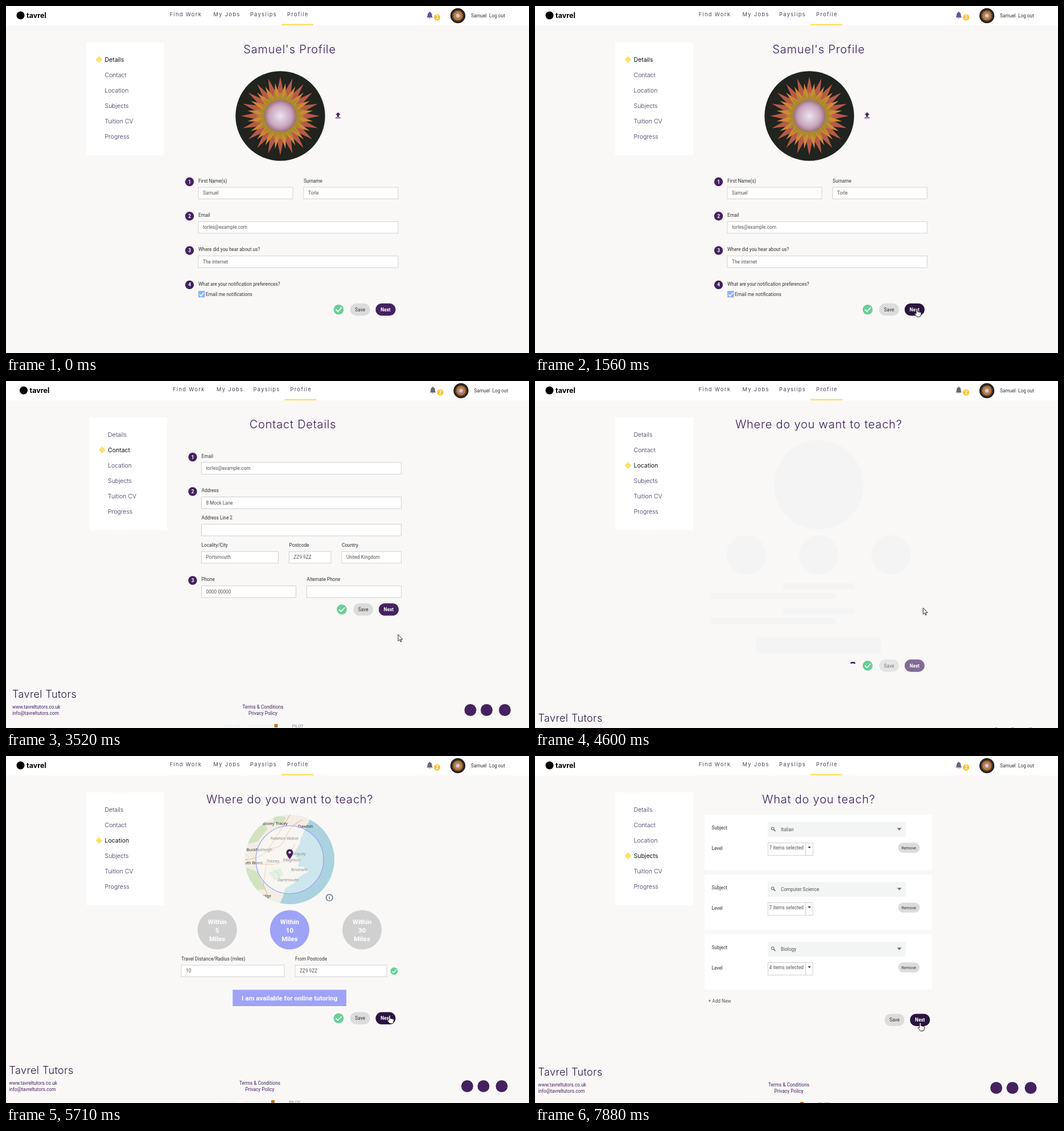
An HTML page for the animation above (8 s loop, 919 px wide and 609 px high).

```html
<!DOCTYPE html>
<html lang="en">
<head>
<meta charset="utf-8">
<title>Tutor profile walkthrough</title>
<style>
  html, body { margin: 0; width: 100%; height: 100%; overflow: hidden; background: #f9f8f7; }
  svg { display: block; width: 100%; height: 100%; }
  text { font: 8.27px Roboto, sans-serif; fill: #333; }
  .title { font: 300 20px Inter, sans-serif; letter-spacing: .8px; fill: #3a1d5c; text-anchor: middle; }
  .brand { font: 300 18px Inter, sans-serif; letter-spacing: .4px; fill: #2c1b40; }
  .logo { font: 700 12.5px Inter, sans-serif; fill: #000; }
  .nav { font: 9.3px Inter, sans-serif; letter-spacing: 1.35px; fill: #4b4358; }
  .menu { font: 300 10.5px Inter, sans-serif; fill: #3f2d5c; }
  .menu.on { fill: #111; font-weight: 400; }
  .value { fill: #555; }
  .link { fill: #452160; }
  .mid { text-anchor: middle; }
  .num { font-weight: 700; fill: #fff; text-anchor: middle; }
  .big { font-size: 11.6px; font-weight: 700; fill: #fff; text-anchor: middle; }
  .town { font: 7.2px "Noto Sans", sans-serif; fill: #333; }
  .end { text-anchor: end; }
  .small { font-size: 7.2px; text-anchor: middle; }
  .pilot { font-size: 7.6px; fill: #888; }
  .faint { font-size: 8px; fill: #ecebea; }
</style>
</head>
<body>
<svg id="stage" viewBox="0 0 919 609"></svg>
<script>
const PURPLE = '#452160', LILAC = '#9fa3f7', GREEN = '#67cf98', BONE = '#f4f4f5';
const LOOP = 8000;

const text = (x, y, s, cls = '') => `<text x="${x}" y="${y}" class="${cls}">${s}</text>`;
const rect = (x, y, x2, y2, fill, extra = '') =>
  `<rect x="${x}" y="${y}" width="${x2 - x}" height="${y2 - y}" fill="${fill}" ${extra}/>`;
const circle = (x, y, r, fill, extra = '') => `<circle cx="${x}" cy="${y}" r="${r}" fill="${fill}" ${extra}/>`;
const path = (d, fill, extra = '') => `<path d="${d}" fill="${fill}" ${extra}/>`;
const group = (id, body, extra = '') => `<g id="${id}" ${extra}>${body}</g>`;
const line = (color, width) => `stroke="${color}" stroke-width="${width}"`;
const title = s => text(498.6, 83, s, 'title');
const box = (x, y, x2, y2) => rect(x, y, x2, y2, '#fff', line('#ccc', .9));
const input = (x, x2, y, s) => box(x, y, x2, y + 20.5) + text(x + 8, y + 13, s, 'value');
const field = (x, x2, y, label, s) => text(x, y - 8.5, label) + input(x, x2, y, s);
const badge = (n, y) => circle(322.5, y, 7.7, PURPLE) + text(322.5, y + 3, n, 'num');
const tick = (x, y, r) => circle(x, y, r, GREEN) +
  path(`M${x - r * .55} ${y}l${r * .4} ${r * .42} ${r * .75} ${-r * .82}`, 'none', line('#fff', r * .2));

// Protea-like flower: three star rings round a pale heart, unit radius.
const star = (n, outer, inner, turn) => Array.from({ length: n * 2 }, (_, i) => {
  const a = (i + turn) * Math.PI / n, r = i % 2 ? inner : outer;
  return `${(r * Math.cos(a)).toFixed(3)},${(r * Math.sin(a)).toFixed(3)}`;
}).join(' ');
const petals = (fill, ...shape) => `<polygon points="${star(...shape)}" fill="${fill}"/>`;
const flower = (x, y, r) => `<g transform="translate(${x} ${y}) scale(${r})">` +
  circle(0, 0, 1, '#20231e') + petals('#b65a49', 20, .88, .5, 0) + petals('#ce8a35', 20, .74, .42, 1) +
  petals('#a98a2c', 24, .55, .4, 0) + circle(0, 0, .36, 'url(#heart)') + '</g>';

const defs = `<defs>
  <radialGradient id="heart"><stop offset="0" stop-color="#efe3ef"/><stop offset=".7" stop-color="#c7a5bb"/>
  <stop offset="1" stop-color="#9b6d78"/></radialGradient>
  <clipPath id="round"><circle cx="498.5" cy="181.5" r="78.5"/></clipPath></defs>`;

const nav = [[287.5, 'Find Work'], [364.5, 'My Jobs'], [429, 'Payslips'], [494, 'Profile']];
const header = circle(25.5, 16.5, 7, '#000') + text(36, 21, 'tavrel', 'logo') +
  nav.map(([x, s]) => text(x, 18.3, s, 'nav')).join('') + rect(484, 31.5, 540, 34, '#ffe066') +
  path('M739 20.2q1.8-1.2 1.8-4.2 0-4.2 3-4.8v-1.2h1.6v1.2q3 .6 3 4.8 0 3 1.8 4.2zM743 21h3q-1.5 1.7-3 0z', '#6b6675', 'id="bell"') +
  circle(757.5, 20, 5.5, '#fbc02d') + text(757.5, 22.5, '2', 'num') +
  flower(794, 17, 13.2) + text(817, 19.7, 'Samuel') + text(849, 19.7, 'Log out');

const menuItems = ['Details', 'Contact', 'Location', 'Subjects', 'Tuition CV', 'Progress'];
const menuY = i => 94 + 27.1 * i;
const sidebar = rect(141, 64, 277.7, 262, '#fff') +
  menuItems.map((s, i) => text(173.5, menuY(i) + 3.7, s, 'menu')).join('') +
  path('M163.5-6l6 6-6 6-6-6z', '#ffe066', 'id="marker"');

const footer = text(5.5, 556.3, 'Tavrel Tutors', 'brand') +
  text(5.5, 574.5, 'www.tavreltutors.co.uk', 'link') + text(5.5, 586.3, 'info@tavreltutors.com', 'link') +
  text(446, 574.5, 'Terms &amp; Conditions', 'link mid') + text(446, 586.3, 'Privacy Policy', 'link mid') +
  [810.5, 839, 871].map(x => circle(x, 577.5, 10.5, PURPLE)).join('') +
  text(376, 607.8, 'Sold out', 'faint') + text(421, 607.8, 'Powered by', 'faint') +
  rect(466, 602, 472, 608, '#b9772a') + text(497, 607.5, 'PILOT', 'pilot');

const details = title("Samuel's Profile") + flower(482, 193, 78.7) +
  path('M583.5 186.5l4.5 4.5h-2.7v3.7h-3.6V191h-2.7zM579 195.8h9v1.3h-9z', PURPLE) +
  [1, 2, 3, 4].map(n => badge(n, 248.2 + 60.3 * n)).join('') +
  field(338, 504, 318, 'First Name(s)', 'Samuel') + field(523, 689, 318, 'Surname', 'Torle') +
  field(338, 689, 378.3, 'Email', 'torles@example.com') +
  field(338, 689, 438.7, 'Where did you hear about us?', 'The internet') +
  text(338, 490.6, 'What are your notification preferences?') +
  rect(338, 500, 349.5, 511.5, '#8fb3f5') +
  path('M340 506l2.8 3 5-6', 'none', line('#fff', 1.6)) + text(351, 508.5, 'Email me notifications');

const contact = title('Contact Details') + badge(1, 133.5) + badge(2, 194) + badge(3, 350) +
  field(338, 689, 143, 'Email', 'torles@example.com') + field(338, 689, 203.5, 'Address', '8 Mock Lane') +
  field(338, 689, 251.3, 'Address Line 2', '') + field(338, 473, 299.2, 'Locality/City', 'Portsmouth') +
  field(492, 565.5, 299.2, 'Postcode', 'ZZ9 9ZZ') + field(584.5, 689, 299.2, 'Country', 'United Kingdom') +
  field(338, 504, 359.5, 'Phone', '0000 00000') + field(523, 689, 359.5, 'Alternate Phone', '');

const towns = [[495, 120.5, 'Bovey Tracey', 'end'], [513, 125.5, 'Dawlish'], [465, 146.5, 'Newton Abbot'],
  [468, 166.5, 'Buckfastleigh', 'end'], [527, 173.5, 'Torquay', 'end'], [487, 185, 'Paignton'],
  [458, 187, 'Totnes'], [451, 189.5, 'South Brent', 'end'], [501, 202, 'Brixham'],
  [477, 220, 'Dartmouth'], [466, 247.7, 'Kingsbridge', 'end']];
const map = rect(418, 100, 580, 262, '#f2eee6') +
  path('M418 125l28-22 14 25-18 22-24 6zM420 195l22 8 14 30-26 6zM462 205l20-8 6 12-16 10zM470 105l22 2-6 14-16-4z', '#d3e3c0') +
  path('M420 182q30-2 42-20t38-60M462 162q22 2 30-20t30-30M440 188q30 6 52-4l16-30M458 186l-6 40 14 34', 'none', line('#efb99b', 1.3)) +
  path('M540 100l-13 25-9 20-2 10-9 13 2 9 7 5-3 12 10 1 8 8-16 9-7 10-17 10-4 14-8 18h110V100zM484 224l-6-16-12-12 14 10z', '#aad3df') +
  towns.map(([x, y, s, side = '']) => text(x, y, s, 'town ' + side)).join('') +
  circle(498.5, 182, 59.5, 'rgba(255,255,255,.42)', line('#9a9ef5', 1.2)) +
  path('M498.5 181q-6-7.5-6-11.5a6 6 0 0 1 12 0q0 4-6 11.5z', PURPLE) + circle(498.5, 169.3, 2.1, '#fff');
const distance = (x, miles, fill) => circle(x, 305, 34.6, fill) +
  ['Within', miles, 'Miles'].map((s, i) => text(x, 295.3 + 14.6 * i, s, 'big')).join('');
const location_ = circle(498.5, 181.5, 78.5, BONE) + group('map', map, 'clip-path="url(#round)"') +
  circle(568.2, 248.5, 5.7, 'none', line('#333b5c', 1.1)) + rect(567.7, 247.5, 568.8, 251.5, '#333b5c') +
  rect(567.7, 245.2, 568.8, 246.4, '#333b5c') +
  distance(371.2, 5, '#d0d0d0') + distance(498.4, 10, LILAC) + distance(625.6, 30, '#d0d0d0') +
  field(308, 489, 367, 'Travel Distance/Radius (miles)', '10') + field(508, 669, 367, 'From Postcode', 'ZZ9 9ZZ') +
  tick(682, 377.5, 6.5) + rect(398.3, 410.3, 598, 439, LILAC) +
  text(498.2, 429, 'I am available for online tutoring', 'big');
const bars = (rows, fill = BONE) => rows.map(r => rect(...r, fill)).join('');
const locationBones = circle(498.5, 182, 78.5, BONE) +
  [371.2, 498.4, 625.6].map(x => circle(x, 305, 34.6, BONE)).join('') +
  bars([[436, 355, 561, 366], [308, 372, 528, 383], [436, 399, 561, 409.5], [308, 416, 528, 427], [388, 449, 608, 478]]);

const boneCard = (y, split, start) => rect(298, y, 697.5, y + 66.5, '#fff') +
  bars([[310.5, y + 12.5, split, y + 24.5], [start, y + 12.5, 651.5, y + 24.5],
    [310.5, y + 32, split, y + 44], [start, y + 32, 618.8, y + 44], [637.8, y + 32, 684.5, y + 44]]);
const subjectBones = boneCard(103, 357.5, 376) + boneCard(177.7, 390, 408.5);
const subjectCard = (y, subject, count) => rect(298, y, 697.5, y + 97, '#fff') +
  text(310.5, y + 26, 'Subject') + text(310.5, y + 62.3, 'Level') +
  rect(409, y + 13, 651.7, y + 39, '#f3f4f4') +
  circle(417.6, y + 24.3, 2.4, 'none', line('#555', 1)) + path(`M419.3 ${y + 26}l3 3`, 'none', line('#555', 1.2)) +
  text(432, y + 29, subject, 'value') + path(`M636 ${y + 23.3}h8.4l-4.2 4.4z`, '#777') +
  box(409.3, y + 49.5, 488.3, y + 71.5) + path(`M475.5 ${y + 49.5}v22`, 'none', line('#ccc', .9)) +
  text(411.5, y + 61.2, count + ' items selected', 'value') + path(`M479.3 ${y + 56}h5.6l-2.8 3.2z`, '#444') +
  rect(638.2, y + 49.3, 676, y + 66.7, '#dcdcdc', 'rx="8.7"') + text(657, y + 60.5, 'Remove', 'small');
const subjects = subjectCard(103, 'Italian', 7) + subjectCard(208, 'Computer Science', 7) +
  subjectCard(313, 'Biology', 4) + text(304.5, 433, '+ Add New', 'value');

const buttons = group('tick', tick(584.5, 0, 8.8)) +
  path('M-3.9-3.9A5.5 5.5 0 0 1 3.9-3.9', 'none', `id="spinner" ${line('#35205a', 2.6)}`) +
  group('pills', rect(604.8, -10.8, 639.6, 10.8, '#dcdcdc', 'rx="10.8"') + text(622.2, 2.9, 'Save', 'mid') +
    rect(649.5, -10.8, 684.5, 10.8, PURPLE, 'rx="10.8" id="next"') + text(667, 2.9, 'Next', 'num'));

const ask = title('Where do you want to teach?'), askSubject = title('What do you teach?');
const pages = { details, contact, locationBones: ask + locationBones, location: ask + location_,
  subjectBones: askSubject + subjectBones, subjects: askSubject + subjects };

const stage = document.getElementById('stage');
stage.innerHTML = defs + rect(0, 0, 919, 609, '#f9f8f7') + rect(0, 0, 919, 34, '#fff') +
  group('shell', header + sidebar + Object.entries(pages).map(([id, body]) => group('page-' + id, body)).join('') +
    group('buttons', buttons) + group('footer', footer)) +
  path('M0 0V11.5l2.7-2.5 1.8 4 1.6-.7-1.8-3.9h3.4z', '#fff', `id="arrow" ${line('#111', .9)}`) +
  path('M-1.2 1.2a1.2 1.2 0 0 1 2.4 0v4.3l5 1q1.6.5 1.4 2.2l-.8 3.3-1 2.5H0l-3.8-5q-.6-1.8.8-1.6l1.8 1.2z', '#fff', `id="hand" ${line('#111', .9)}`);

const el = id => document.getElementById(id);
const show = (id, on) => { el(id).style.display = on ? '' : 'none'; };
const move = (id, x, y, more = '') => el(id).setAttribute('transform', `translate(${x} ${y}) ${more}`);

// shift: the page moves sideways when no scrollbar is needed; foot: footer offset.
const phases = [
  { at: 0, page: 'details', active: 0, shift: 0, foot: 200, by: 532.7 },
  { at: 2250, page: 'contact', active: 1, shift: 5.5, foot: 0, by: 401, busy: true },
  { at: 2580, page: 'contact', active: 1, shift: 5.5, foot: 0, by: 401 },
  { at: 4370, page: 'contact', active: 1, shift: 5.5, foot: 0, by: 401, busy: true },
  { at: 4530, page: 'locationBones', active: 2, shift: 0, foot: 41.5, by: 499.6, busy: true },
  { at: 4840, page: 'location', active: 2, shift: 0, foot: 2, by: 460.3 },
  { at: 6950, page: 'subjectBones', active: 3, shift: 5.5, foot: 0, by: 265, bx: 9.5, busy: true },
  { at: 7180, page: 'subjects', active: 3, shift: 0, foot: 5, by: 463.2, bx: 9.5 },
];

const trail = [[200, 822, 80], [440, 560, 290], [620, 330, 322], [800, 203, 220], [960, 335, 160], [1030, 336, 160],
  [1560, 671, 531], [2890, 671, 531], [3520, 689, 445], [3670, 689, 430], [3750, 689, 429], [4220, 672, 399],
  [4370, 672, 399], [4600, 682, 398], [5150, 683, 421], [5240, 683, 422], [5710, 674, 455],
  [7650, 674, 455], [7880, 677, 468], [LOOP, 677, 468]];

function cursorAt(t) {
  const i = trail.findIndex(([at]) => at > t);
  if (i < 1) return null;
  const [t0, x0, y0] = trail[i - 1], [t1, x1, y1] = trail[i], k = (t - t0) / (t1 - t0);
  return [x0 + (x1 - x0) * k, y0 + (y1 - y0) * k];
}

function draw(t) {
  const { at, page, active, shift, foot, by, bx = 0, busy } = phases.findLast(p => p.at <= t);
  for (const id in pages) show('page-' + id, id === page);
  move('shell', shift, 0);
  move('footer', 0, foot);
  move('marker', 0, menuY(active));
  document.querySelectorAll('.menu').forEach((item, i) => item.classList.toggle('on', i === active));
  el('bell').style.fill = active ? '#6b6675' : '#6b4fa0';
  el('map').style.opacity = Math.min(1, (t - 4840) / 300);

  move('buttons', bx, by);
  show('tick', !bx);
  show('spinner', busy);
  move('spinner', bx ? 588 : 558.5, 0, `rotate(${(t - at - 70) * .4})`);
  el('pills').style.opacity = busy ? .65 : 1;

  const cursor = cursorAt(t);
  const [x, y] = cursor || [0, 0];
  const hover = !!cursor && !busy && Math.abs(x - shift - bx - 667) < 17.5 && Math.abs(y - by) < 10.8;
  el('next').style.fill = hover ? '#2b1440' : PURPLE;
  show('arrow', cursor && !hover);
  show('hand', hover);
  move('arrow', x, y);
  move('hand', x, y);
}

const begin = performance.now();
(function tickFrame() {
  draw((performance.now() - begin) % LOOP);
  requestAnimationFrame(tickFrame);
})();
</script>
</body>
</html>
```
